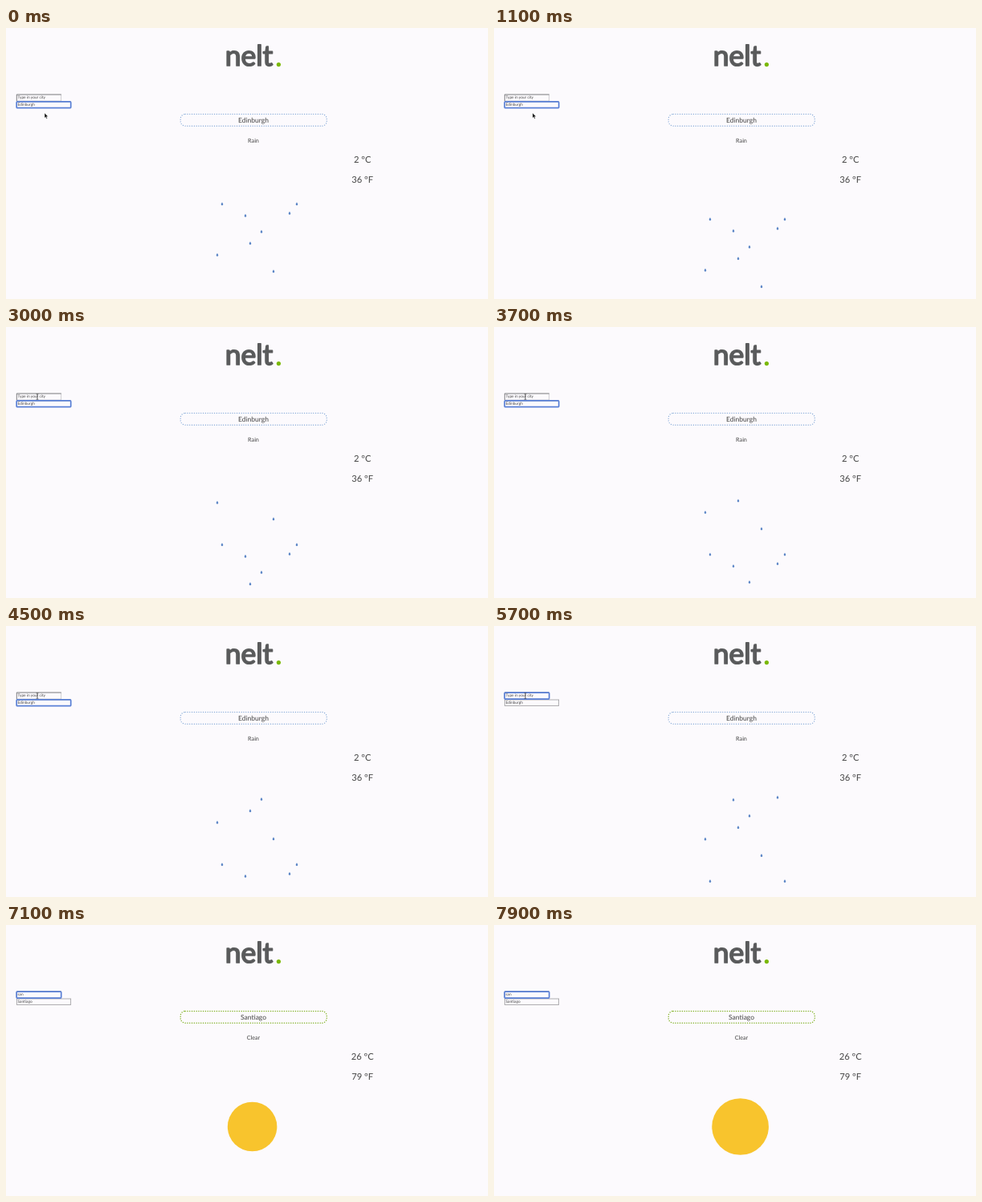
An HTML page for the animation above (8 s loop, 600 px wide and 338 px high).

```html
<!DOCTYPE html>
<html lang="en">
<head>
<meta charset="utf-8">
<title>Weather</title>
<style>
  html, body { margin: 0; width: 100%; height: 100%; overflow: hidden; background: #fcfafd; }
  svg { display: block; width: 600px; height: 338px; }
  text { font-family: Lato, "Open Sans", sans-serif; fill: #444; text-rendering: geometricPrecision; white-space: pre; }
  .mid { text-anchor: middle; }
  .small { font-size: 4.8px; }
  .brand { font-size: 35.5px; fill: #5a5b5c; stroke: #5a5b5c; stroke-width: 1.7; stroke-linejoin: round; }
  .temp { font-size: 11.2px; }
  .box { fill: none; stroke: #8d8d90; stroke-width: .7; }
  .box.inset { stroke: #bdbdc2; }
  .ring { fill: none; stroke: #5a80d6; stroke-width: 1.7; }
  #pill { fill: none; stroke-linecap: round; stroke-dasharray: 0 2.8; }
</style>
</head>
<body>
<svg viewBox="0 0 600 338">
  <rect width="600" height="338" fill="#fcfafd"/>
  <text class="brand" x="272.7" y="47.4">nelt</text>
  <circle cx="339.4" cy="45.6" r="2.6" fill="#7ab800"/>

  <rect class="box inset" x="13.3" y="83" width="55.4" height="8"/>
  <path d="M13.3 91V83H68.7" fill="none" stroke="#77777a" stroke-width=".8"/>
  <rect class="box" x="13.3" y="92" width="67.4" height="7.6"/>
  <rect class="ring" id="ring" x="13.2" rx="1"/>
  <text class="small" id="query" x="14.5" y="88.4"></text>
  <text class="small" id="option" x="14.5" y="97.2"></text>
  <path id="caret" d="M0 84.6V89.6" stroke="#222" stroke-width=".7"/>

  <rect id="pill" x="217.2" y="107.4" width="182" height="14.8" rx="6"/>
  <text class="mid" id="city" x="308" y="117.5" font-size="8.5"></text>
  <text class="mid" id="sky" x="308" y="143.3" font-size="7.2"></text>
  <text class="mid temp" id="celsius" x="443.7" y="167.8"></text>
  <text class="mid temp" id="fahrenheit" x="443.7" y="193.2"></text>

  <g id="rain" fill="#5c86c6"></g>
  <circle id="sun" cx="306.6" cy="251.5" fill="#f8c42d"/>

  <path id="arrow" d="M0 0V6.2L1.4 5 2.4 7.3 3.4 6.9 2.5 4.6H4.4Z" fill="#111" stroke="#fff" stroke-width=".4"/>
  <path id="beam" d="M-1.3 -3.5Q0 -3.5 0 -2.6Q0 -3.5 1.3 -3.5M0 -2.7V2.7M-1.3 3.5Q0 3.5 0 2.6Q0 3.5 1.3 3.5" fill="none" stroke="#333" stroke-width=".7"/>
</svg>
<script>
const LOOP = 8000, STEP = 100;
const FOCUS = 5200, SWITCH = 6300, PULSE = 1000;
const RAIN = { top: 208, span: 116, speed: 0.01735 };
const drops = [[269, 219.5], [362, 219.5], [353, 231], [298, 234],
               [318, 254], [304, 268.5], [263, 283], [333, 303.5]];
const pointer = [[1200, 48, 106], [1600, 42, 91], [1900, 40, 86.5], [2200, 39, 87]];
const typing = [[0, "Type in your city"], [5900, "s"], [6000, "sa"], [6200, "san"]];
const wet = { city: "Edinburgh", sky: "Rain", celsius: "2 °C", fahrenheit: "36 °F" };
const dry = { city: "Santiago", sky: "Clear", celsius: "26 °C", fahrenheit: "79 °F" };

const $ = id => document.getElementById(id);
const show = (id, on) => $(id).setAttribute("visibility", on ? "visible" : "hidden");
const place = (el, x, y) => el.setAttribute("transform", `translate(${x} ${y})`);
const smooth = p => p * p * (3 - 2 * p);

const dropEls = drops.map(() => {
  const el = document.createElementNS("http://www.w3.org/2000/svg", "path");
  el.setAttribute("d", "M0 -2.3C.4 -1.3 1.3 -.6 1.3 .4A1.3 1.3 0 0 1 -1.3 .4C-1.3 -.6 -.4 -1.3 0 -2.3Z");
  return $("rain").appendChild(el);
});

function pointerAt(t) {
  const i = pointer.findIndex(k => k[0] > t);
  if (i === 0) return pointer[0].slice(1);
  if (i < 0) return pointer[pointer.length - 1].slice(1);
  const [t0, x0, y0] = pointer[i - 1], [t1, x1, y1] = pointer[i];
  const p = (t - t0) / (t1 - t0);
  return [x0 + (x1 - x0) * p, y0 + (y1 - y0) * p];
}

function drawInputs(t) {
  const upper = t >= FOCUS;
  const typed = typing.filter(k => k[0] <= t);
  const [since, text] = typed[typed.length - 1];
  $("query").textContent = text;
  $("ring").setAttribute("y", upper ? 83.1 : 91.9);
  $("ring").setAttribute("width", upper ? 55.5 : 67.5);
  $("ring").setAttribute("height", upper ? 8 : 7.8);

  const blink = (t - Math.max(since, FOCUS)) % 1000;
  show("caret", upper && blink < 500);
  place($("caret"), since ? 14.5 + text.length * 2.45 : 14.3, 0);

  const [x, y] = pointerAt(t), hidden = since > 0, overText = y < 92;
  show("arrow", !hidden && !overText);
  show("beam", !hidden && overText);
  place($("arrow"), x, y);
  place($("beam"), x, y);
}

function drawWeather(t) {
  const clear = t >= SWITCH;
  const report = clear ? dry : wet;
  for (const id in report) $(id).textContent = report[id];
  $("option").textContent = report.city;
  $("pill").setAttribute("stroke", clear ? "#7fb022" : "#86aad8");
  $("pill").setAttribute("stroke-width", clear ? 1.5 : 1.35);

  show("rain", !clear);
  drops.forEach(([x, y], i) => {
    const fall = (y - RAIN.top + RAIN.speed * t) % RAIN.span;
    place(dropEls[i], x, RAIN.top + fall);
  });

  show("sun", clear);
  const phase = Math.max(0, t - SWITCH) % PULSE / PULSE;
  const grow = smooth(1 - Math.abs(1 - 2 * phase));
  $("sun").setAttribute("r", 27.8 + 8.4 * grow);
}

const start = performance.now();
function frame(now) {
  const t = Math.floor(Math.max(0, now - start) % LOOP / STEP) * STEP;
  drawInputs(t);
  drawWeather(t);
  requestAnimationFrame(frame);
}
frame(start);
</script>
</body>
</html>
```
